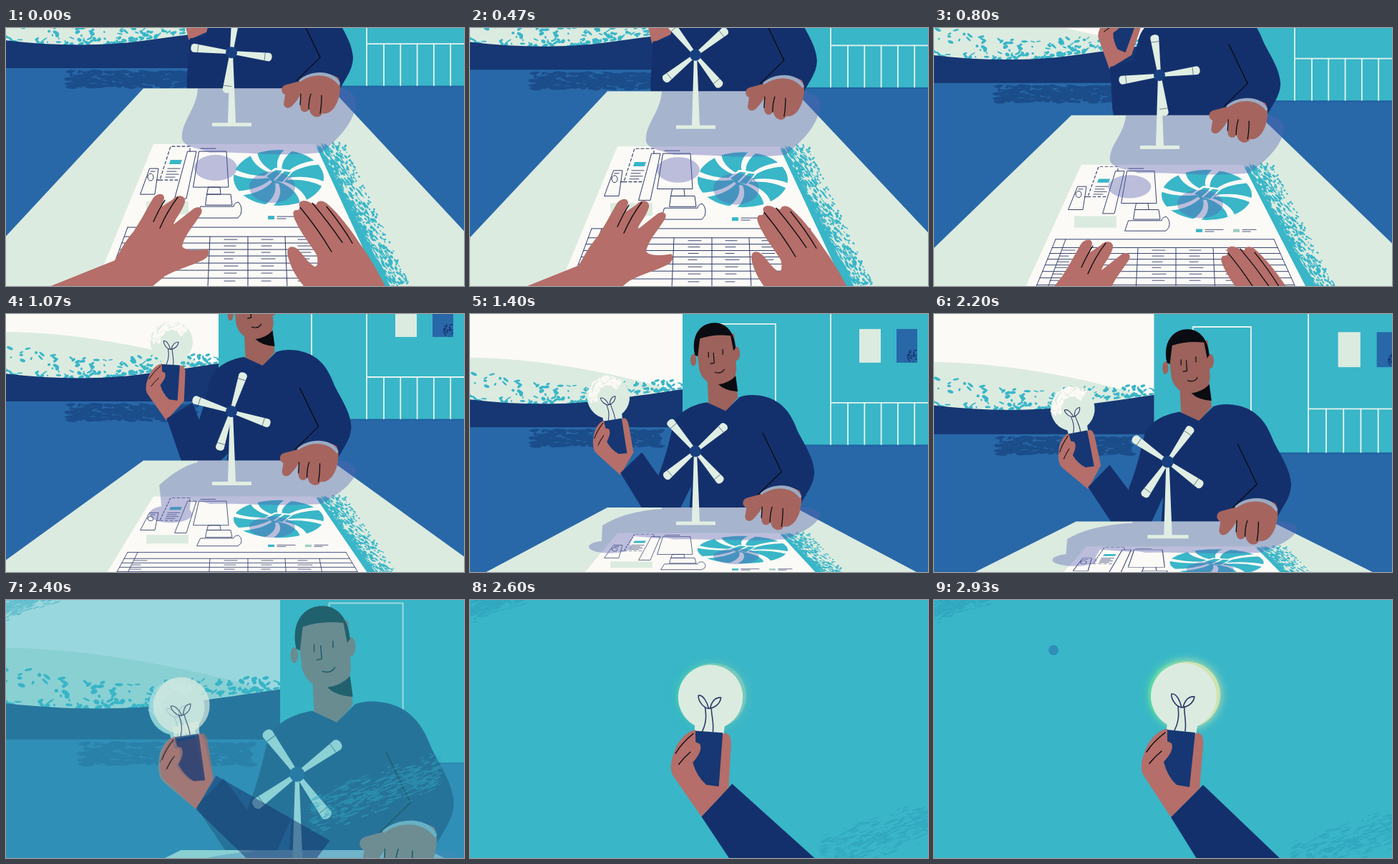
An HTML page with a canvas for the animation above (2.99 s loop, 640 by 360 pixels).

```html
<!DOCTYPE html>
<html lang="en">
<head>
<meta charset="utf-8">
<title>Bulb and wind turbine</title>
<style>
html, body { margin: 0; height: 100%; overflow: hidden; background: #39b6c8; }
canvas { display: block; width: 100vw; height: 100vh; }
</style>
</head>
<body>
<canvas id="stage" width="640" height="360"></canvas>
<script>
const ctx = document.getElementById('stage').getContext('2d');
const LOOP = 2990;
const TEAL = '#39b6c8', BLUE = '#2868a8', NAVY = '#14306c', HILL = '#163773',
  CREAM = '#fcfaf6', SAGE = '#dcebe0', INK = '#0a0c12', PEN = '#2c3a68',
  FACE = '#9c625b', PALM = '#a5655e', SKIN = '#b56e69';

const clamp = v => Math.max(0, Math.min(1, v));
const ramp = (t, a, b) => clamp((t - a) / (b - a));
const cubic = u => u < .5 ? 4 * u ** 3 : 1 - 4 * (1 - u) ** 3;

function fill(path, color) {
  ctx.fillStyle = color;
  ctx.fill(new Path2D(path));
}
function line(path, color = INK, width = 1.3) {
  ctx.strokeStyle = color;
  ctx.lineWidth = width;
  ctx.stroke(new Path2D(path));
}
function oval(x, y, rx, ry, color) {
  ctx.fillStyle = color;
  ctx.beginPath();
  ctx.ellipse(x, y, rx, ry, 0, 0, 7);
  ctx.fill();
}
function rect(x, y, w, h, color) {
  ctx.fillStyle = color;
  ctx.fillRect(x, y, w, h);
}
function group(draw, x = 0, y = 0, turn = 0, sx = 1, sy = sx) {
  ctx.save();
  ctx.translate(x, y);
  ctx.rotate(turn * Math.PI / 180);
  ctx.scale(sx, sy);
  draw();
  ctx.restore();
}

// Rough brush textures: many small seeded ovals in one path
function specks(seed, count, place) {
  const rand = () => (seed = seed * 16807 % 2147483647) / 2147483647;
  const path = new Path2D();
  for (let i = 0; i < count; i++) {
    const [x, y, rx, ry, turn = 0] = place(rand);
    path.moveTo(x + rx * Math.cos(turn), y + rx * Math.sin(turn));
    path.ellipse(x, y, rx, ry, turn, 0, 7);
  }
  return path;
}
const ridge = x => 125 + 6 * Math.sin(x / 62) - Math.max(0, x - 150) * .06;
const foliage = specks(71, 170, r => {
  const x = r() * 300, depth = 42 - x * .1;
  return [x, ridge(x) + 1 - r() ** 1.8 * depth, 1 + r() * 4, .7 + r() * 1.8, r() * 1.6 - .8];
});
const strip = specks(19, 420, r =>
  [88 + r() * 182, 168 + r() * 23, 2 + r() * 7, .5 + r() * 1.7, r() * .3 - .15]);
const frameDust = specks(5, 40, r => [611 + r() * 13, 56 + r() * 17, .4 + r(), .4 + r() * .7]);
const brushEdge = specks(43, 700, r => {
  const y = 166 + r() * 200, u = r() ** 1.3;
  return [436 + (y - 162) * .46 + u * 34, y - u * 8, 1 + r() * 5 * (1.2 - u), .4 + r() * 1.3, .9];
});
const bulbDust = specks(9, 150, r => {
  const a = 3.1 + r() * 2.6, d = 24 + r() * 20;
  return [349 + d * Math.cos(a), 132 + d * Math.sin(a), 1 + r() * 5, 1 + r() * 2, a + 1.6];
});
const stroke = (seed, w, h) => specks(seed, 430, r => {
  const u = r() - .5, v = (r() + r() - 1) * h;
  return [u * w, v - u * w * .36, 1 + r() * 7, .3 + r() * .9, -.35];
});
const sweepA = stroke(31, 110, 17), sweepB = stroke(83, 180, 32);

function dust(path, color) {
  ctx.fillStyle = color;
  ctx.fill(path);
}

function background() {
  rect(-10, -20, 660, 600, BLUE);
  rect(-10, -20, 307, 180, CREAM);
  fill('M-10 67C80 66 190 84 297 116V150H-10Z', SAGE);
  dust(foliage, TEAL);
  fill('M-10 124C60 133 130 134 190 126C230 121 270 115 297 111V164H-10Z', HILL);
  dust(strip, '#1b4d8b');
  rect(297, -20, 360, 210, TEAL);
  rect(297, 188.5, 360, 2, '#1f5f9f');
  line('M349 150V20H427V150M504 -20V188M504 130H650', '#e6f3ef', 1.8);
  for (let x = 528; x < 640; x += 23.3) line(`M${x} 130V188`, '#e6f3ef', 1.8);
  rect(544, 27, 30, 47, SAGE);
  rect(596, 27, 29, 47, BLUE);
  dust(frameDust, NAVY);
}

// Hand holding the bulb, drawn around the bulb centre; sleeve is its opacity
function bulbHand(x, y, scale, turn, glow, sleeve) {
  group(() => {
    ctx.translate(-350, -134);
    if (sleeve) {
      ctx.globalAlpha = sleeve;
      fill('M376 258L331 303L440 478L530 405Z', NAVY);
      ctx.globalAlpha = Math.sqrt(sleeve);
    }
    if (glow) {
      ctx.save();
      ctx.globalAlpha *= glow;
      ctx.shadowBlur = 14;
      for (const [dx, c] of [[-4, '#43d3a8'], [5, '#cfe3b0']]) {
        ctx.shadowColor = c;
        oval(349 + dx, 132, 46, 46, c);
      }
      ctx.restore();
    }
    fill('M326 165L370 165L366 187L325 184Z', SAGE);
    oval(349, 134, 46, 46, SAGE);
    if (!sleeve) dust(bulbDust, CREAM);
    line('M336 182C343 168 342 158 341 148M351 183C353 168 349 158 350 149M346 150C338 149 331 138 332 131C339 130 344 141 346 150C350 150 362 147 364 135C354 134 350 142 348 150', PEN, 1.6);
    fill('M331 303L293 245C287 236 290 220 297 206C302 193 316 180 326 180L330 190L362 190C367 182 378 184 376 204L371 263Z', SKIN);
    fill('M326 181L365 185L357 261L339 258Q326 246 321 226C330 216 335 208 332 200L326 197Z', HILL);
    line('M297 212Q306 198 323 185M301 228Q309 218 318 211', INK, 1.5);
  }, x, y, turn, scale);
}

function man(p) {
  fill('M331 95L370 88L374 127L357 148L333 135Z', FACE);
  oval(312, 75, 4, 8.5, FACE);
  oval(372, 66, 5, 10, FACE);
  fill('M315 42L369 38L372 88C371 101 362 108 350 109C334 110 324 103 320 88Z', FACE);
  fill('M347 109Q362 107 371 97L374 119Q356 118 347 109Z', INK);
  fill('M314 68C308 40 322 23 342 23C360 23 370 40 371 58L368 62L364 41Q342 38 321 45L318 70Z', INK);
  line('M333 64V71M353 60V67M340 65L341 79L336 80M342 92Q351 95 355 88', INK, 1.2);
  group(() => {
    ctx.translate(-275, -285);
    bulbHand(188, 130, .645, -17, 0, 0);
    fill('M237 205L208 235L240 283L275 325L312 285L262 238Z', NAVY);
  }, 275, 285, 38 * (1 - p));
  fill('M331 134L357 146L376 127C390 121 412 124 425 131C445 142 452 160 458 175C469 196 480 212 481 232C480 250 470 260 462 276L430 310H262L263 236C272 214 278 190 283 168C288 150 306 138 331 134Z', NAVY);
  // Gap between torso and raised arm
  fill(`M309 ${300 - 52 * p}L292 285V310H306V285Z`, BLUE);
  line('M409 177L435 231L402 263', INK);
}

function restingHand() {
  fill('M410 74L391 79C384 81 383 90 390 93L388 106C390 114 398 112 402 106C408 100 411 94 412 92L411 108C411 118 420 120 424 112C424 124 438 128 442 119C452 121 460 112 464 100C468 86 468 76 464 69C446 59 424 63 410 74Z', PALM);
  fill('M409 73C427 56 460 59 467 77L465 80C454 64 430 61 411 75Z', '#9aabc3');
  line('M412 92L411 107M426 92Q423 101 423 113M441 94Q441 108 439 119', INK);
}

function fan() {
  group(() => {
    oval(0, 0, 1, 1, TEAL);
    for (let i = 0; i < 8; i++) {
      ctx.save();
      ctx.rotate(i * Math.PI / 4 + .2);
      fill('M.2 -.04Q.62 -.24 1.03 -.07L1 .1Q.62 -.1 .2 .04Z', CREAM);
      ctx.restore();
    }
  }, 381, 209, 0, 63, 39);
  fill('M360 207L376 195L402 199L387 217Z', CREAM);
  fill('M364 207L377 198L386 199L373 213ZM376 213L389 200L398 201L386 215Z', TEAL);
}

function paper() {
  fill('M206 162H432L546 410H104Z', CREAM);
  line('M201 196H213L208 232H188ZM254 172H266L252 238H236ZM270 172H308L311 222H262ZM283 222H299L300 232H281ZM281 232H314L316 247H279ZM272 249H318Q319 243 325 243Q331 250 328 260L324 265H267ZM272 168H293M198 208a4 5 0 1 0 8 0a4 5 0 1 0 -8 0M202 200H208', PEN, 1);
  ctx.setLineDash([4, 3]);
  line('M257 172V165H230L215 212H208M215 212H240', PEN, 1.1);
  ctx.setLineDash([]);
  fill('M230 184H246L244 190H228Z', TEAL);
  line('M226 196H243M225 200H238M224 204H241M223 208H236', PEN, .9);
  rect(196, 242, 59, 18, SAGE);
  rect(366, 262, 9, 5, TEAL);
  rect(418, 262, 9, 5, '#9dcfc0');
  line('M379 263H404M379 266H391M431 263H450M431 266H442', PEN, .9);
  const rows = [278, 291, 300, 309, 318, 328, 338, 349, 361];
  rows.forEach((y, i) => {
    const d = y - 278, left = 170 - d * .37, right = 475 + d * .4;
    line(`M${left} ${y}H${right}`, PEN, 1);
    if (i) for (const x of [left + 14, 305, 357, 408])
      line(`M${x} ${y + 4}h${12 + (i * 7 + x | 0) % 9}`, PEN, .9);
  });
  line('M170 278L139 362M475 278L509 362M285 291L282 362M338 291V362M390 291L393 362M438 291L447 362M184 278L156 362', PEN, 1);
  fan();
}

function shade(p) {
  const x = 293 - 103 * p;
  const path = new Path2D('M268 84C266 115 244 130 246 155C250 168 275 168 285 174C340 172 370 180 440 174C452 165 482 140 488 112C492 100 488 90 470 84Z');
  path.moveTo(x + 30, 195);
  path.ellipse(x, 195, 30, 18, 0, 0, Math.PI * 2, true);
  if (p > .25) {
    const w = 268 - 88 * p;
    path.addPath(new Path2D(`M268 88Q${w + 30} 95 ${w} 135L${x - 12} 190L${x + 26} 195L${w + 44} 165L268 172Z`));
  }
  path.moveTo(404, 222);
  path.ellipse(372, 222, 32, 22, 0, 0, Math.PI * 2, true);
  dust(path, 'rgba(88,98,178,.4)');
}

function desk(p) {
  group(() => {
    ctx.translate(0, -84);
    fill('M192 84H454L749 400H-102Z', SAGE);
    ctx.translate(0, -6 * p);
    fill('M432 164L442 172L542 370H528Z', TEAL);
    dust(brushEdge, TEAL);
    paper();
    ctx.translate(0, 6 * p);
    shade(p);
  }, 0, 84 + 197 * p, 0, 1, 1 - .535 * p);
}

function turbine(t, p) {
  group(() => {
    fill('M-2 0H2L6 98H28V103H-27V98H-5Z', '#e0eee3');
    for (let i = 0; i < 4; i++) group(() => {
      fill('M-2.5 -5L-6 -53Q-5 -57 0 -57Q5 -57 6 -53L2.5 -5Z', '#e0eee3');
      line('M-5.5 -47H5.5', '#5b6c80', .8);
    }, 0, 0, 7 + t * .0945 + i * 90);
    oval(0, 0, 8, 8, '#164080');
  }, 315, 34 + 167 * p);
}

function readerHands() {
  fill('M62 360L152 324C160 310 166 298 178 284C190 266 198 250 205 238C210 230 221 229 221 237L218 249L233 239C239 231 252 233 250 243C246 256 236 266 234 274L262 252C270 247 277 252 272 260C262 276 250 288 246 304C250 312 270 310 281 308C286 312 283 320 274 324C258 332 240 336 222 346L205 360L150 440L-60 410Z', SKIN);
  line('M222 240Q214 252 206 270M240 236Q226 254 215 279', INK);
  fill('M530 360C520 340 506 316 494 300C484 284 466 260 450 246C444 239 434 240 434 246L426 244C416 237 406 242 411 250L408 254C400 252 400 260 404 268C412 286 424 300 434 316C437 326 435 335 430 332C420 326 412 310 404 306C394 302 391 310 395 322C400 340 410 352 416 360L450 440H570Z', SKIN);
  line('M411 250Q436 280 455 312M428 244Q450 270 470 299M448 249Q470 276 484 300', INK);
}

function deskScene(t) {
  const p = 1 / (1 + Math.exp(-(t - 1003) * .0071));
  const lift = 1 - p;
  group(background, 0, -108 * lift);
  group(() => man(p), 4 * lift, -190 * lift);
  desk(p);
  group(restingHand, -4 * p, 188 * p);
  turbine(t, p);
  if (p < .5) group(readerHands, 0, 335 * p);
}

function bulbScene(t, q, fade) {
  ctx.globalAlpha = fade;
  rect(0, 0, 640, 360, TEAL);
  group(() => dust(sweepA, '#31a8c0'), 10 + 10 * q, 4 + 6 * q);
  group(() => dust(sweepB, '#31a8c0'), 445 + 145 * q, 200 + 135 * q);
  const dot = 7 * ramp(t, 2760, 2930);
  if (dot) oval(167, 70, dot, dot, '#2f8fb8');
  bulbHand(142 + 208 * q, 160 - 26 * q, .72 + .28 * q, -28 * (1 - q), ramp(t, 2480, 2900), fade);
  ctx.globalAlpha = 1;
}

function draw(now) {
  // Picture advances fifteen times a second
  const t = Math.floor(now % LOOP / 66.5) * 200 / 3;
  const q = cubic(ramp(t, 2000, 2800));
  const fade = ramp(t, 2250, 2550);
  ctx.lineCap = ctx.lineJoin = 'round';
  if (fade < 1) group(() => deskScene(t), -18 * q, -44 * q, 0, 1 + .64 * q);
  if (fade > 0) bulbScene(t, q, fade);
}

const start = performance.now();
function tick() {
  draw(performance.now() - start);
  requestAnimationFrame(tick);
}
tick();
</script>
</body>
</html>
```
